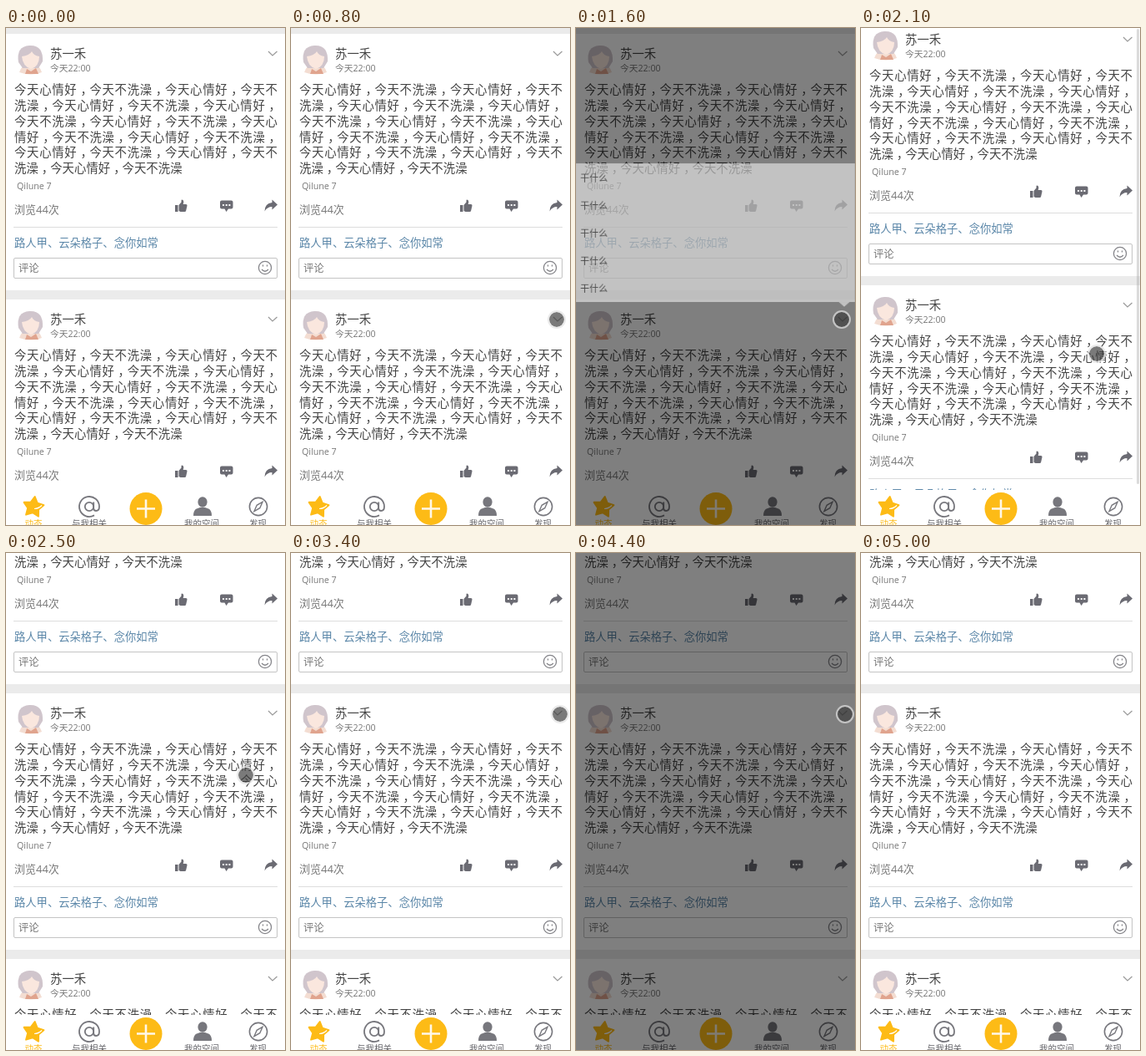
Recreate the animation shown at these times as an HTML page. Size 335 by 595 pixels, loop 5300 ms.

```html
<!DOCTYPE html>
<html lang="zh-CN">
<head>
<meta charset="utf-8">
<title>动态</title>
<style>
html, body { margin: 0; width: 100%; height: 100%; overflow: hidden; background: #fff; }
.stage {
  position: relative; width: 335px; height: 595px; overflow: hidden; background: #fff;
  font: 14.4px/20px "Open Sans", "Noto Sans CJK SC", "Noto Sans CJK", sans-serif; color: #444;
}
.stage * { box-sizing: border-box; }
.feed, .post > *, .nav, .shade, .popup, .cursor, .bar { position: absolute; }
.feed, .shade, .popup, .cursor, .bar { animation: 5.3s step-end infinite; }

.feed { top: -4px; left: 0; width: 335px; animation-name: scroll; }
.post { position: relative; height: 318px; }
.post > * { left: 10px; margin: 0; white-space: nowrap; }
.post > svg { left: 0; top: 0; }
.post .name { left: 53px; top: 25px; }
.post .time { left: 53px; top: 42px; font-size: 10.7px; color: #777; }
.post .body {
  top: 69.4px; width: 316px; line-height: 18.75px; white-space: normal;
  text-align: justify; text-spacing-trim: space-all;
}
.post .body i { position: relative; left: 4px; font-style: normal; }
.post .device { left: 13px; top: 183px; font-size: 10.7px; color: #777; }
.post .views { top: 211px; font-size: 13px; color: #777; }
.post .likes { top: 251px; font-size: 13.3px; color: #5a86a8; }
.post .reply {
  left: 9px; top: 279px; width: 317px; height: 25px; padding-left: 5px;
  border: 1px solid #c4c4c4; border-radius: 2px; font-size: 12.3px; line-height: 23px; color: #777;
}

.nav { left: 0; top: 553px; background: #fff; font-size: 10.5px; font-weight: 500; }
.bar { left: 331px; top: 1px; width: 3px; height: 545px; border-radius: 2px; background: #999; animation-name: bar; }
.shade { inset: 0; background: #000; animation-name: shade; }

.popup { left: 0; width: 335px; height: 165.6px; background: #fafafa; font-size: 11px; line-height: 33.1px; color: #222; }
.popup div { padding-left: 5px; }
.popup::after {
  content: ""; position: absolute; left: 315px; width: 14px; height: 6px; background: inherit;
}
.above { top: 161.7px; transform-origin: 322px 171.3px; animation-name: above; }
.above::after { top: 100%; clip-path: polygon(0 0, 100% 0, 50% 100%); }
.below { top: 208.9px; transform-origin: 322px -5.9px; animation-name: below; }
.below::after { bottom: 100%; clip-path: polygon(0 100%, 100% 100%, 50% 0); }

.cursor {
  left: -11px; top: -11px; width: 22px; height: 22px; border-radius: 50%;
  background: rgba(60, 60, 60, .68); background-clip: padding-box;
  border: 2px solid rgba(225, 225, 225, .7); animation-name: cursor;
}

@keyframes scroll {
  0% { transform: none; }
  39.6% { transform: translateY(-17px); }
  41.5% { transform: translateY(-56px); }
  43.3% { transform: translateY(-101px); }
  45.2% { transform: translateY(-138px); }
  47.1%, 100% { transform: translateY(-157px); }
}
@keyframes bar {
  0% { opacity: 0; }
  39.6% { opacity: .35; }
  47.1% { opacity: 0; }
  84.8% { opacity: .2; }
  90.5% { opacity: .12; }
  92.4% { opacity: .06; }
  94.3%, 100% { opacity: 0; }
}
@keyframes shade {
  0% { opacity: 0; }
  18.8% { opacity: .2; }
  20.7% { opacity: .48; }
  22.6% { opacity: .5; }
  37.7% { opacity: 0; }
  67.9% { opacity: .3; }
  69.8% { opacity: .49; }
  71.6% { opacity: .5; }
  84.8%, 100% { opacity: 0; }
}
@keyframes above {
  0% { opacity: 0; transform: scale(1.18); }
  18.8% { opacity: .3; transform: scale(1.18); }
  20.7% { opacity: 1; transform: scale(1.056); }
  22.6% { opacity: 1; transform: none; }
  28.3% { opacity: .85; transform: none; }
  30.1% { opacity: .55; transform: none; }
  32% { opacity: .25; transform: none; }
  33.9% { opacity: .08; transform: none; }
  35.8%, 100% { opacity: 0; transform: none; }
}
@keyframes below {
  0% { opacity: 0; transform: scale(1.1); }
  67.9% { opacity: .75; transform: scale(1.1); }
  69.8% { opacity: 1; transform: scale(1.0205); }
  71.6% { opacity: 1; transform: none; }
  75.4% { opacity: .85; transform: none; }
  77.3% { opacity: .55; transform: none; }
  79.2% { opacity: .25; transform: none; }
  81.1% { opacity: .08; transform: none; }
  83%, 100% { opacity: 0; transform: none; }
}
@keyframes cursor {
  0% { opacity: 0; transform: translate(307px, 321px); }
  5.6% { opacity: .8; transform: translate(307px, 321px); }
  7.5% { opacity: 1; transform: translate(309px, 328px); }
  9.4% { opacity: 1; transform: translate(312px, 335px); }
  11.3% { opacity: 1; transform: translate(315px, 341px); }
  13.2% { opacity: 1; transform: translate(317px, 346px); }
  15% { opacity: 1; transform: translate(319px, 349px); }
  37.7% { opacity: 1; transform: translate(283px, 406px); }
  39.6% { opacity: 1; transform: translate(283px, 390px); }
  41.5% { opacity: 1; transform: translate(284px, 358px); }
  43.3% { opacity: 1; transform: translate(286px, 319px); }
  45.2% { opacity: 1; transform: translate(287px, 285px); }
  47.1% { opacity: 1; transform: translate(288px, 266px); }
  50.9% { opacity: 1; transform: translate(298px, 243px); }
  52.8% { opacity: 1; transform: translate(310px, 218px); }
  54.7% { opacity: 1; transform: translate(319px, 200px); }
  56.6% { opacity: 1; transform: translate(323px, 193px); }
  84.8%, 100% { opacity: 0; transform: translate(323px, 193px); }
}
</style>
</head>
<body>
<div class="stage">
  <div class="feed"></div>
  <div class="bar"></div>

  <svg class="nav" width="335" height="42" viewBox="0 553 335 42" fill="#77777d" text-anchor="middle">
    <g fill="#fdbb16">
      <path transform="rotate(8 33 573)" stroke="#fdbb16" stroke-width="2" stroke-linejoin="round"
        d="M33 561l4 7 8 1.500-5.500 6 1 8.300-7.500-3.500-7.500 3.500 1-8.300-5.500-6 8-1.500z"/>
      <path d="M34 575.500q5 0 9-4" fill="none" stroke="#fff" stroke-width="1.200"/>
      <text x="33" y="596.500">动态</text>
      <circle cx="168" cy="575.500" r="19.500"/>
    </g>
    <path d="M168 564.500v22M157 575.500h22" stroke="#fff8e8" stroke-width="2.600"/>
    <g fill="none" stroke="#77777d" stroke-width="1.800">
      <circle cx="100" cy="573" r="5.200"/>
      <path d="M105.200 567.500v7.500q0 3 3 3 3.800 0 3.800-5a12 12 0 1 0-6 10.400"/>
      <circle cx="303" cy="573" r="10.600" stroke-width="1.600"/>
      <path d="M308 567.500l-3.200 7.200-6.800 3.800 3.200-7.200z" stroke-width="1.400"/>
    </g>
    <ellipse cx="236" cy="567.500" rx="5.600" ry="6.200"/>
    <path d="M225 584q0-7 4-8.500l4-1.500h6l4 1.500q4 1.500 4 8.500z"/>
    <g fill="#66666b">
      <text x="100" y="596.500">与我相关</text>
      <text x="235" y="596.500">我的空间</text>
      <text x="302.500" y="596.500">发现</text>
    </g>
  </svg>

  <div class="shade"></div>
  <div class="popup above"></div>
  <div class="popup below"></div>
  <div class="cursor"></div>
</div>

<template id="post">
  <article class="post">
    <svg width="335" height="318" fill="#6b6b73">
      <path d="M0 0h335v11H0z" fill="#ebebeb"/>
      <g>
        <path d="M16 57q2-8 10-9h7q8 1 10 9-13 5-27 0z" fill="#f3ddd2"/>
        <path d="M15 45q-3-19 13-20 17-1 16 19l-5 8H20z" fill="#d0c5cc"/>
        <path d="M19 38q9-1 12-6 2 5 9 6 0 12-10 15-10-3-11-15z" fill="#fae7de"/>
        <path d="M25 53l5 3 6-4 3 7H23z" fill="#e0a48e"/>
      </g>
      <path d="M315 32l5 5 5.500-5" fill="none" stroke="#999" stroke-width="1.200"/>
      <path transform="translate(203 209.500)"
        d="M0 6.500h3.500v8H0zM4.500 6.500l3-3.500V1q0-1 1-1 2 .3 1.800 3l-.6 2.500H13q1.800 0 1.500 1.800l-1.300 5.700q-.3 1.500-1.700 1.500H6.500l-2-1z"/>
      <path d="M259 210.500h11.500q2 0 2 2v6q0 2-2 2H267l-2.500 3.500-2-3.500H259q-2 0-2-2v-6q0-2 2-2z"/>
      <path d="M260 215h2v2h-2zM263.700 215h2v2h-2zM267.400 215h2v2h-2z" fill="#fff"/>
      <path transform="translate(310.500 209.500)" d="M9 0l6.500 6L9 12V8.500Q3 8.500 0 14 0 4.500 9 3.500z"/>
      <path d="M9 242.500h317" stroke="#ddd"/>
      <g fill="none" stroke="#85858a" stroke-width="1.300">
        <circle cx="311" cy="291" r="7.600"/>
        <path d="M307 293q4 4.500 8 0M308.500 287.500v2M313.500 287.500v2"/>
      </g>
    </svg>
    <div class="name">苏一禾</div>
    <div class="time">今天22:00</div>
    <p class="body"></p>
    <div class="device">Qilune 7</div>
    <div class="views">浏览44次</div>
    <div class="likes">路人甲、云朵格子、念你如常</div>
    <div class="reply">评论</div>
  </article>
</template>

<script>
const feed = document.querySelector('.feed');
const template = document.getElementById('post');
const comma = '<i>，</i>';
const story = Array(5).fill('今天心情好' + comma + '今天不洗澡').join(comma);

for (let i = 0; i < 3; i++) {
  const post = template.content.cloneNode(true);
  post.querySelector('.body').innerHTML = story + comma + story.slice(0, 0) +
    Array(5).fill('今天心情好' + comma + '今天不洗澡').join(comma);
  feed.append(post);
}
for (const popup of document.querySelectorAll('.popup')) {
  popup.innerHTML = '<div>干什么</div>'.repeat(5);
}
</script>
</body>
</html>
```
